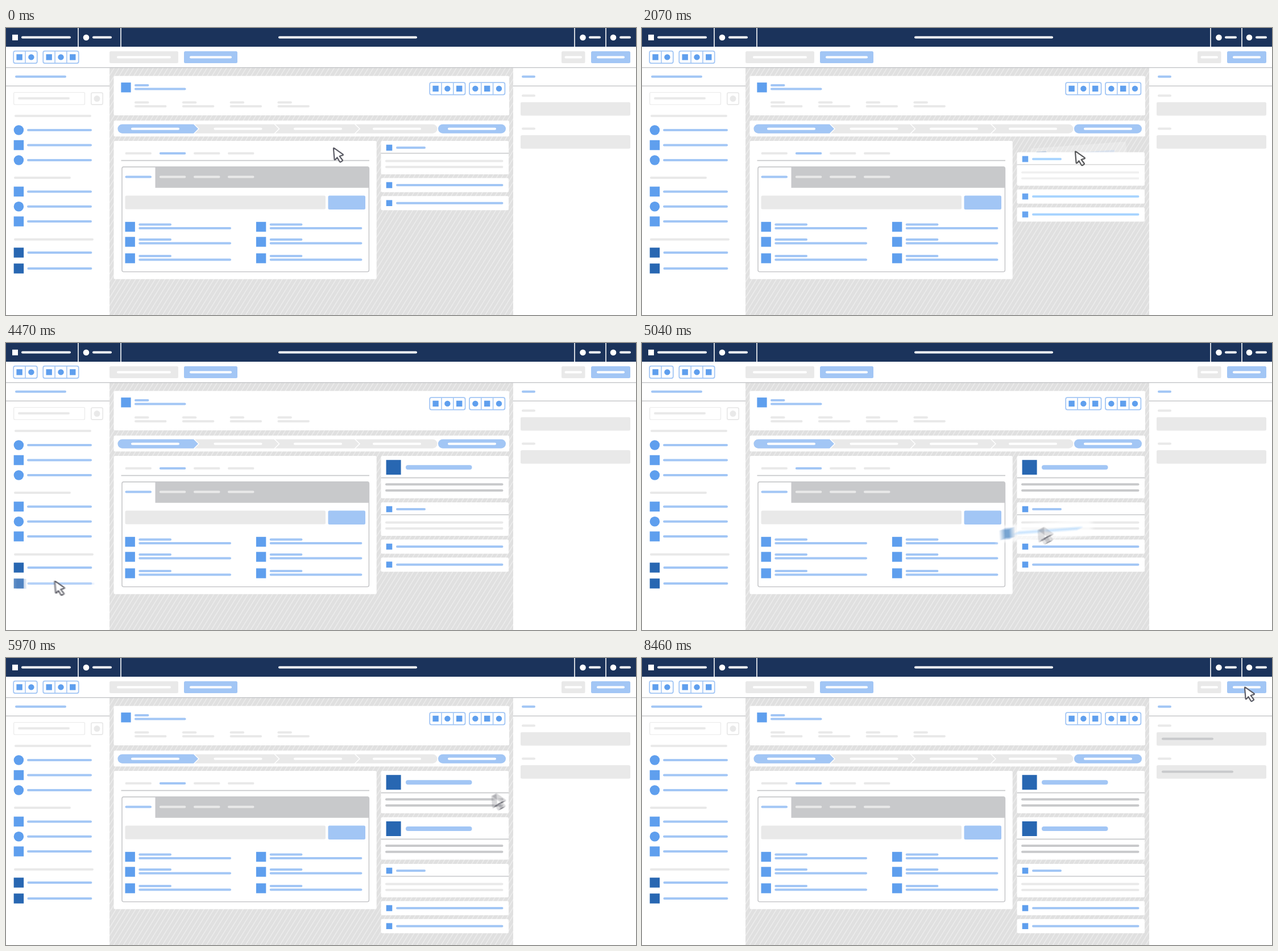
An HTML page with a canvas for the animation above (9.9 s loop, 1108x506 px).

```html
<!DOCTYPE html>
<html lang="en">
<head>
<meta charset="utf-8">
<title>Drag and drop wireframe</title>
<style>
  html, body { margin: 0; width: 100%; height: 100%; overflow: hidden; background: #fff; }
  canvas { display: block; }
</style>
</head>
<body>
<canvas id="stage" width="1108" height="506"></canvas>
<script>
const W = 1108, H = 506, LOOP = 9900, STEP = 30;
const NAVY = '#1b335b', BLUE = '#5f9fee', SKY = '#a2c6f5', PALE = '#e9e9e9',
      GREY = '#c8c9cb', WHITE = '#fff', BADGE = '#2867b2', INK = '#58595b';

const layer = () => Object.assign(document.createElement('canvas'), { width: W, height: H }).getContext('2d');
const screen = document.getElementById('stage').getContext('2d');
const backdrop = layer(), sample = layer(), sum = layer();
let g = backdrop; // context the helpers draw on

// ---- shapes ----
function box(x1, y1, x2, y2, color, r = 0) {
  g.fillStyle = color;
  g.beginPath();
  g.roundRect(x1, y1, x2 - x1, y2 - y1, r);
  g.fill();
}
function frame(x1, y1, x2, y2, color, width, r) {
  g.strokeStyle = color;
  g.lineWidth = width;
  g.beginPath();
  g.roundRect(x1, y1, x2 - x1, y2 - y1, r);
  g.stroke();
}
const bar = (x1, x2, y, color, h = 4) => box(x1, y - h / 2, x2, y + h / 2, color, h / 2);
const rule = (x1, x2, y) => box(x1, y - 0.8, x2, y + 0.8, GREY);
const square = (x, y, size, color = BLUE) =>
  box(x - size / 2, y - size / 2, x + size / 2, y + size / 2, color);
const dot = (x, y, size, color = BLUE) =>
  box(x - size / 2, y - size / 2, x + size / 2, y + size / 2, color, size / 2);

// Segmented button: one letter per cell, s = square, c = circle
function segments(x, y, cells) {
  frame(x, y, x + cells.length * 20.8, y + 21.4, SKY, 1.8, 3);
  [...cells].forEach((cell, i) => {
    const cx = x + 10.4 + i * 20.8;
    if (i) box(cx - 11.2, y, cx - 9.6, y + 21.4, SKY);
    (cell === 's' ? square : dot)(cx, y + 10.7, 10.4);
  });
}

// ---- static parts ----
function drawTopBars() {
  box(0, 0, W, 33, NAVY);
  for (const x of [127, 202, 1000, 1055]) box(x - 0.8, 0, x + 0.8, 33, WHITE);
  square(16, 16.7, 10, WHITE);
  for (const x of [141, 1014.5, 1068]) dot(x, 16.7, 10.6, WHITE);
  for (const [a, b] of [[27, 114], [152, 186], [479, 723], [1025, 1046], [1079, 1099]])
    bar(a, b, 16.5, WHITE);

  segments(13.2, 40.7, 'sc');
  segments(65.3, 40.7, 'scs');
  for (const [a, b, inset, color] of [[182, 303, 13, PALE], [313, 407, 10, SKY], [977, 1018.5, 5.5, PALE], [1029, 1098, 10, SKY]]) {
    box(a, 41, b, 62, color, 2.5);
    bar(a + inset, b - inset, 51.5, WHITE);
  }
}

function drawSidebars() {
  bar(16, 106, 85.8, SKY);
  rule(0, 182, 102.2);
  frame(13.7, 113.5, 138.5, 135, PALE, 1.2, 2);
  bar(21, 112, 124, PALE);
  frame(149.8, 114.2, 170.2, 135, PALE, 1.8, 2.5);
  dot(160, 124.6, 11, PALE);
  bar(15, 150, 155, PALE);
  bar(14, 114, 264, PALE);
  bar(14, 154, 372.8, PALE);
  for (const [y, mark] of [[180, dot], [206.5, square], [233, dot], [288.4, square], [314.7, dot], [341, square]]) {
    mark(22.4, y, 17.5);
    bar(37, 151, y, SKY);
  }
  for (const y of [396, 424]) drawRow(22.4, y);

  bar(907, 931, 85.8, SKY);
  rule(892, W, 102.2);
  for (const y of [119.3, 177.5]) {
    bar(907, 931, y, PALE);
    box(905, y + 11.5, 1098, y + 35.2, PALE, 2.5);
  }
}

function drawRow(x, y) {
  square(x, y, 17.5, BADGE);
  bar(x + 15, x + 129, y, SKY);
}

function drawHatch() {
  g.save();
  g.beginPath();
  g.rect(182, 70, 710, H - 70);
  g.clip();
  box(182, 70, 892, H, '#e0e0e0');
  g.strokeStyle = '#efefef';
  g.lineWidth = 1.2;
  g.beginPath();
  for (let x = 182; x < 1180; x += 8.6) {
    g.moveTo(x, 70);
    g.lineTo(x - 268, H);
  }
  g.stroke();
  g.restore();
}

function drawHeader() {
  box(189.5, 84.5, 885, 154, WHITE, 2.5);
  square(211, 104.8, 17.3);
  bar(226, 251.5, 100.9, SKY);
  bar(226, 316.5, 107.5, SKY);
  for (const x of [226, 309.8, 393.6, 477.4]) {
    bar(x, x + 25.5, 131.2, PALE);
    bar(x, x + 56.5, 138, PALE);
  }
  segments(745.2, 96.2, 'scs');
  segments(815, 96.2, 'csc');

  box(189.5, 163.2, 885, 191.3, WHITE, 2.5);
  box(196.5, 169.7, 758.5, 185.7, PALE, 8);
  g.fillStyle = SKY;
  g.beginPath();
  g.moveTo(204.5, 169.7);
  g.lineTo(331, 169.7);
  g.lineTo(339, 177.7);
  g.lineTo(331, 185.7);
  g.lineTo(204.5, 185.7);
  g.arc(204.5, 177.7, 8, Math.PI / 2, Math.PI * 1.5);
  g.fill();
  g.strokeStyle = WHITE;
  g.lineWidth = 1.5;
  for (const x of [339, 480.5, 622]) {
    g.beginPath();
    g.moveTo(x - 9, 168.7);
    g.lineTo(x, 177.7);
    g.lineTo(x - 9, 186.7);
    g.stroke();
  }
  box(760, 169.7, 879, 185.7, SKY, 8);
  for (const x of [220, 365.5, 506, 645, 777]) bar(x, x + 85, 177.8, WHITE);
}

function drawMainPanel() {
  const tabs = [209.5, 269.8, 330, 390];
  box(189.5, 199, 651.7, 442.7, WHITE, 2.5);
  tabs.forEach((x, i) => bar(x, x + 46.5, 221, i === 1 ? SKY : PALE));
  rule(202.5, 639, 233.6);
  box(262.5, 244.7, 638.5, 281.7, GREY, [0, 3, 0, 0]);
  frame(204, 244.9, 638.4, 429.8, GREY, 1.6, 3);
  tabs.forEach((x, i) => bar(x, x + 46.5, 262.5, i ? PALE : SKY));
  box(209.5, 295.5, 562, 319.5, PALE, 2.5);
  box(566.5, 295.5, 632, 320, SKY, 2.5);
  for (const x of [209.5, 439.9]) for (const y of [350.5, 377, 406]) {
    square(x + 8.7, y, 17.4);
    bar(x + 23.8, x + 81.5, y - 4.1, SKY);
    bar(x + 23.8, x + 186.5, y + 2.5, SKY);
  }
}

drawHatch();
drawTopBars();
rule(0, W, 69.8);
drawSidebars();
drawHeader();
drawMainPanel();

// ---- motion ----
const progress = (t, a, b) => Math.min(1, Math.max(0, (t - a) / (b - a)));
const smooth = p => p * p * (3 - 2 * p);
const eased = (t, a, b) => smooth(progress(t, a, b));
const overshoot = p => p ? 1 + 2.7 * (p - 1) ** 3 + 1.7 * (p - 1) ** 2 : 0;

// start, end, target, optional curve control
const moves = [
  [0, 960, [81, 391]],
  [1170, 1920, [761, 217], [480, 395]],
  [3270, 3930, [81, 419]],
  [4440, 5190, [760, 293.5], [480, 465]],
  [5700, 6390, [1046, 138]],
  [6900, 7300, [1057, 198], [1080, 150]],
  [8010, 8460, [1059, 51], [1080, 120]]
];
const drops = [
  { fly: [1170, 1920], push: [1980, 2205], grow: [2670, 3030] },
  { fly: [4440, 5190], push: [5190, 5340], grow: [5350, 5710] }
];

function cursorAt(t) {
  let from = [575, 211];
  for (const [a, b, to, via] of moves) {
    if (t <= a) break;
    const s = eased(t, a, b), start = from;
    from = start.map((v, i) => {
      const mid = via ? via[i] : (v + to[i]) / 2;
      return v * (1 - s) ** 2 + 2 * mid * s * (1 - s) + to[i] * s * s;
    });
  }
  return from;
}

// Stack shift, then the height of each added card
function stackAt(t) {
  let shift = 0;
  const heights = drops.map(({ push, grow: [a, b] }) => {
    shift += 19.5 * overshoot(progress(t, ...push)) + 62.5 * eased(t, a, b);
    return eased(t, a + 80, b);
  });
  return [shift, ...heights];
}

function ghostAt(t, { fly: [a, b] }) {
  const fade = progress(t, a, a + 90) * (1 - progress(t, b + 60, b + 200));
  return [...cursorAt(t), -4.2 * eased(t, a, a + 300), 0.65 * fade];
}

// ---- moving parts ----
function drawStack([shift, ...heights]) {
  heights.forEach((height, i) => {
    if (!height) return;
    g.save();
    g.translate(0, 199 + i * 81.8);
    g.scale(1, height);
    g.globalAlpha = Math.min(1, 0.5 + height);
    box(659.5, 0, 884, 74.7, WHITE, 2.5);
    square(681.6, 20.2, 26, BADGE);
    bar(703, 819.5, 20.3, SKY, 8);
    rule(659.5, 884, 38.6);
    bar(667, 874.5, 50.3, GREY);
    bar(667, 874.5, 61, GREY);
    g.restore();
  });
  g.save();
  g.translate(0, shift);
  box(659.5, 199, 884, 258, WHITE, 2.5);
  square(674, 211, 10.6);
  bar(686, 738, 211, SKY);
  rule(659.5, 884, 220.8);
  bar(667, 874.5, 234.6, PALE);
  bar(667, 874.5, 245.1, PALE);
  for (const y of [277, 308.7]) {
    box(659.5, y - 12.4, 884, y + 12.6, WHITE, 2.5);
    square(674, y, 10.6);
    bar(686, 874.5, y, SKY);
  }
  g.restore();
}

function drawGhost([x, y, angle, alpha]) {
  g.save();
  g.translate(x, y);
  g.rotate(angle * Math.PI / 180);
  g.globalAlpha = alpha;
  box(-77, -10, 91, 20, WHITE, 2);
  drawRow(-58.6, 5);
  g.restore();
}

const arrow = new Path2D('M1 1.6Q.8 .2 2.2 .9L17.4 11.6Q18.6 12.8 17 13.4L11.6 15L16.9 22Q17.2 22.9 16.4 23.4L13.4 25.2Q12.4 25.5 11.9 24.7L7.5 17.2L4 21.2Q2.8 22 2.6 20.5Z');
function drawCursor([x, y]) {
  g.save();
  g.translate(x, y);
  g.fillStyle = WHITE;
  g.fill(arrow);
  g.strokeStyle = INK;
  g.lineWidth = 2.2;
  g.lineJoin = 'round';
  g.stroke(arrow);
  g.restore();
}

// Averages poses over the shutter time while a part is moving
function withMotionBlur(poseAt, draw, t) {
  const samples = 15, half = 7.5;
  g = screen;
  if (String(poseAt(t - half)) === String(poseAt(t + half))) return draw(poseAt(t));
  sum.clearRect(0, 0, W, H);
  sum.globalCompositeOperation = 'lighter';
  sum.globalAlpha = 1 / samples;
  g = sample;
  for (let k = 0; k < samples; k++) {
    sample.clearRect(0, 0, W, H);
    draw(poseAt(t + half * ((2 * k + 1) / samples - 1)));
    sum.drawImage(sample.canvas, 0, 0);
  }
  g = screen;
  screen.drawImage(sum.canvas, 0, 0);
}

function typed(t, start, end, width, y) {
  const p = progress(t, start, end);
  if (p) bar(914, 914 + Math.max(4, width * p), y, GREY);
}

function render(now) {
  const t = Math.floor((now % LOOP) / STEP) * STEP;
  const drop = drops.find(({ fly: [a, b] }) => t > a && t < b + 200);
  const ghost = () => withMotionBlur(s => ghostAt(s, drop), drawGhost, t);
  const landed = drop && t >= drop.fly[1];

  g = screen;
  screen.clearRect(0, 0, W, H);
  screen.drawImage(backdrop.canvas, 0, 0);
  typed(t, 6390, 6780, 91, 142.5);
  typed(t, 7320, 7890, 126, 200.6);
  if (drop && landed) ghost();
  withMotionBlur(stackAt, drawStack, t);
  if (drop && !landed) ghost();
  withMotionBlur(cursorAt, drawCursor, t);
}

const began = performance.now();
(function tick() {
  render(performance.now() - began);
  requestAnimationFrame(tick);
})();
</script>
</body>
</html>
```
